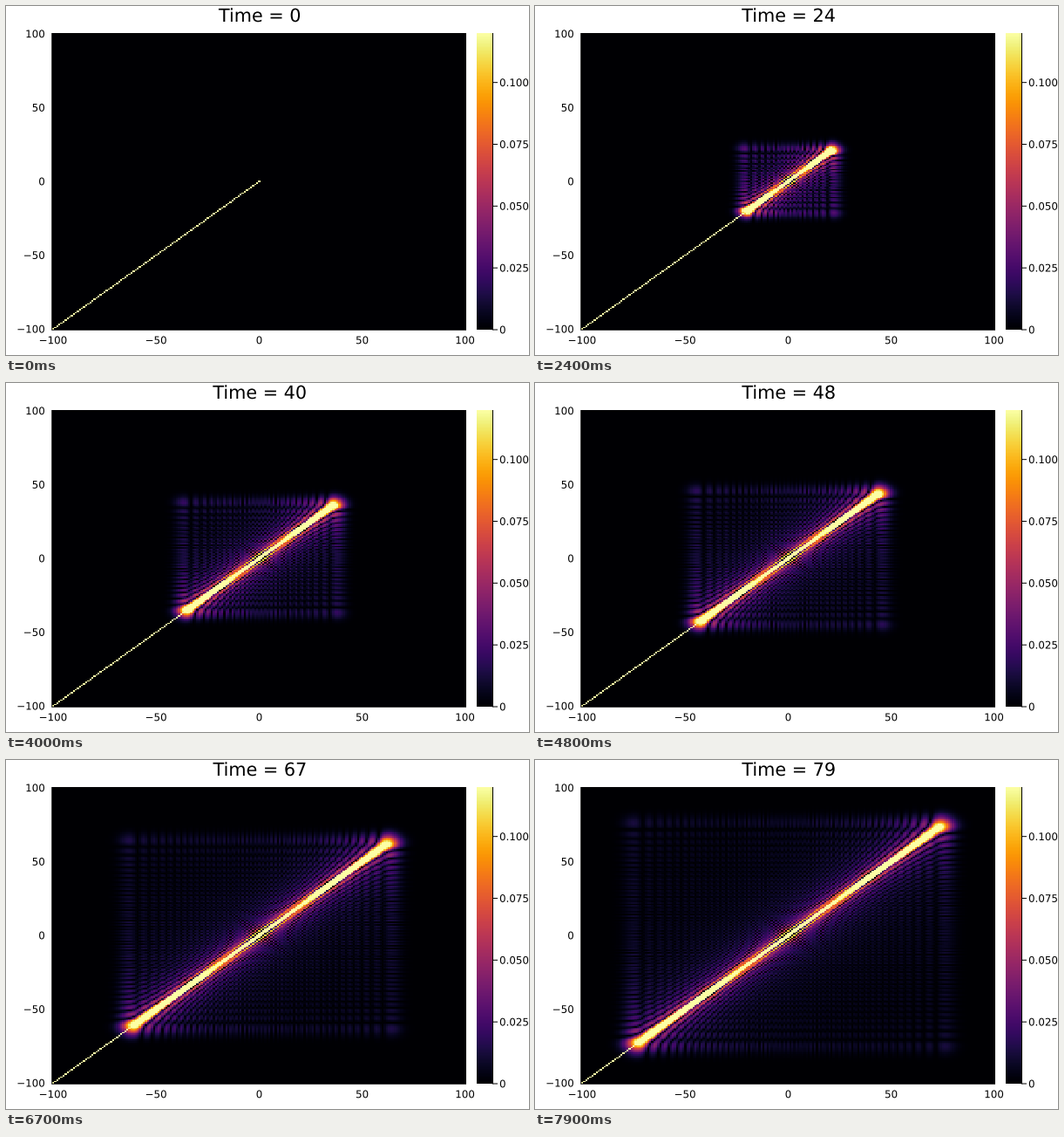
Animation of 600x400 px, one loop 8 s. Source, as a matplotlib script:

```python
import numpy as np
import matplotlib.pyplot as plt
from matplotlib.animation import FuncAnimation
from matplotlib.lines import Line2D
from matplotlib.patches import PathPatch
from matplotlib.textpath import TextPath
from matplotlib.transforms import Affine2D

W, H, DPI = 600, 400, 100
PX = 72 / DPI              # points per pixel
STEPS, INTERVAL = 80, 100
HALF, VMAX = 100, 0.12
LEFT, RIGHT, TOP, BOTTOM = 53, 528, 31, 371
BAR_LEFT, BAR_RIGHT = 540, 558
TICK_SIZE, TITLE_SIZE = 11.85, 20.74
MID = 0.364                # half a digit's height, in em

plt.rcParams["font.family"] = "DejaVu Sans"
fig = plt.figure(figsize=(W / DPI, H / DPI), dpi=DPI, facecolor="white")
to_pixels = Affine2D().scale(1 / W, -1 / H).translate(0, 1) + fig.transFigure


def panel(x0, x1):
    ax = fig.add_axes([x0 / W, 1 - BOTTOM / H, (x1 - x0) / W, (BOTTOM - TOP) / H])
    ax.axis("off")
    return ax


def outline(x, baseline, text, size=TICK_SIZE, align=0.5):
    """Text outline whose ink is aligned at x: 0 left, 0.5 centre, 1 right."""
    path = TextPath((0, 0), text, size=size)
    ink = path.get_extents()
    shift = x - ink.x0 - align * ink.width
    return path.transformed(Affine2D().scale(1, -1).translate(shift, baseline))


def label(*args, **kwargs):
    patch = PathPatch(outline(*args, **kwargs), fc="black", lw=0,
                      transform=to_pixels, snap=False)
    return fig.add_artist(patch)


def line(x0, y0, x1, y1):
    fig.add_artist(Line2D([x0, x1], [y0, y1], color="black", lw=PX, snap=False,
                          solid_capstyle="butt", transform=to_pixels))


# Free fermions hopping on an open chain, left half filled at time zero
SITES = 2 * HALF + 1
hop = np.full(SITES - 1, 0.5)
energy, modes = np.linalg.eigh(np.diag(hop, 1) + np.diag(hop, -1))


def correlations(t):
    u = (modes * np.exp(-1j * energy * t)) @ modes.T
    filled = u[:, :HALF + 1]
    return np.abs(filled @ filled.conj().T)


style = dict(cmap="inferno", origin="lower", aspect="auto", interpolation="nearest")
heat = panel(LEFT, RIGHT).imshow(correlations(0), vmin=0, vmax=VMAX, **style)
panel(BAR_LEFT, BAR_RIGHT).imshow(np.linspace(0, 1, 256)[:, None], **style)

line(LEFT - 0.25, TOP, LEFT - 0.25, BOTTOM + 0.5)
line(LEFT - 0.5, BOTTOM + 0.25, RIGHT, BOTTOM + 0.25)
line(BAR_RIGHT + 0.5, TOP, BAR_RIGHT + 0.5, BOTTOM + 0.5)

for v in range(-HALF, HALF + 1, 50):
    text = str(v).replace("-", "\u2212")
    frac = (v + HALF + 0.5) / SITES
    label(LEFT + frac * (RIGHT - LEFT), 387.2, text)
    label(44, BOTTOM - frac * (BOTTOM - TOP) + MID * TICK_SIZE, text, align=1)

for v in (0, 0.025, 0.05, 0.075, 0.1):
    y = BOTTOM - v / VMAX * (BOTTOM - TOP)
    line(BAR_RIGHT + 0.5, y, 564, y)
    label(566.8, y + MID * TICK_SIZE, f"{v:.3f}" if v else "0", align=0)


def title_path(t):
    return outline((LEFT + RIGHT) / 2, 18, f"Time = {t}", size=TITLE_SIZE)


title = fig.add_artist(PathPatch(title_path(0), fc="black", lw=0,
                                 transform=to_pixels, snap=False))


def update(t):
    heat.set_data(correlations(t))
    title.set_path(title_path(t))
    return heat, title


anim = FuncAnimation(fig, update, frames=STEPS, interval=INTERVAL,
                     repeat=True, repeat_delay=0, blit=False)
plt.show()
```
